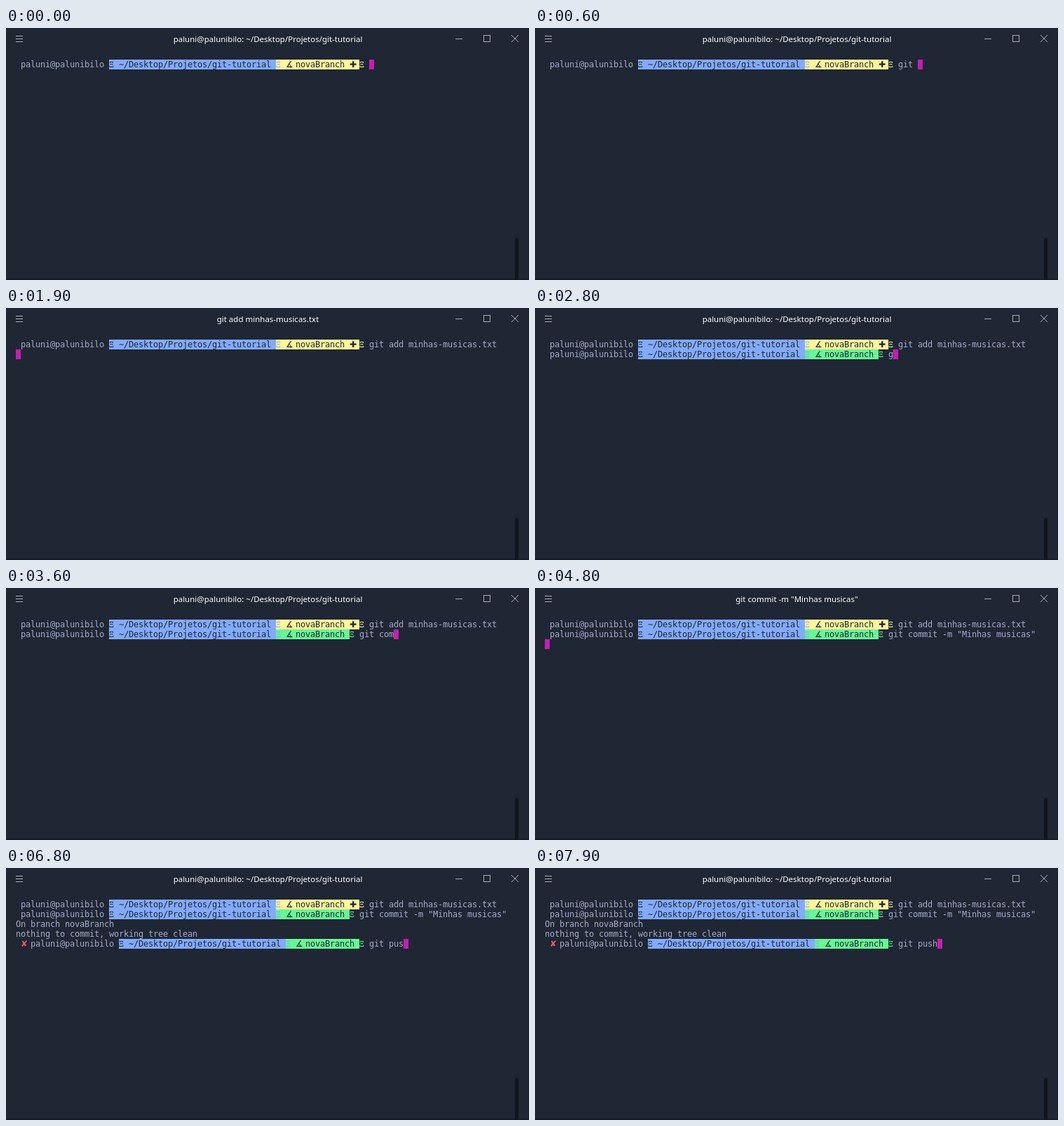
An HTML page with a canvas for the animation above (8000 ms loop, 746 by 359 pixels).

```html
<!DOCTYPE html>
<html lang="pt">
<head>
<meta charset="utf-8">
<title>Terminal</title>
<style>
html, body { margin: 0; width: 100%; height: 100%; overflow: hidden; background: #1e2733; }
canvas { display: block; }
</style>
</head>
<body>
<canvas id="stage" width="746" height="359"></canvas>
<script>
const ctx = document.getElementById('stage').getContext('2d');
const LOOP = 8000, CELL = 7, ROW = 14, LEFT = 14, TOP = 45;
const C = {
  bg: '#1e2733', text: '#a6accd', blue: '#82aaff', yellow: '#fff59b',
  green: '#69f694', cursor: '#c81cb4', red: '#ff5370',
  icon: '#a9aeb5', scroll: '#11161d', edge: '#161d26'
};
const MONO = '12px "DejaVu Sans Mono", monospace';
const SYMBOL = '12px "DejaVu Sans", sans-serif';
const SEPARATOR = '11px "Noto Serif", serif';
const USER = 'paluni@palunibilo';
const PATH = '~/Desktop/Projetos/git-tutorial';
const HOME_TITLE = `${USER}: ${PATH}`;

// keys: [time, number of characters typed]
const commands = [
  { text: 'git add minhas-musicas.txt', row: 0, start: 0, run: 1900, dirty: true,
    keys: [[300, 1], [400, 2], [600, 4], [800, 5], [1000, 7], [1200, 8], [1400, 26]] },
  { text: 'git commit -m "Minhas musicas"', row: 1, start: 2000, run: 4800,
    keys: [[2800, 1], [2900, 2], [3100, 3], [3300, 5], [3500, 6], [3600, 7], [4500, 30]],
    output: ['On branch novaBranch', 'nothing to commit, working tree clean'] },
  { text: 'git push', row: 4, start: 4900, run: Infinity, failed: true,
    keys: [[6100, 2], [6200, 3], [6400, 5], [6600, 6], [6800, 7], [7500, 8], [7600, 7], [7900, 8]] }
];

function rect(x, y, w, h, color) {
  ctx.fillStyle = color;
  ctx.fillRect(x, y, w, h);
}

function fontFor(ch) {
  if (ch === 'Ξ') return SEPARATOR;
  return '∡✚✘'.includes(ch) ? SYMBOL : MONO;
}

// Writes text on the character grid and returns the next free column.
function write(text, col, row, color, back) {
  const y = TOP + row * ROW;
  if (back) rect(LEFT + col * CELL, y, text.length * CELL, ROW, back);
  ctx.fillStyle = color;
  ctx.textAlign = 'left';
  for (const ch of text) {
    ctx.font = fontFor(ch);
    ctx.fillText(ch, LEFT + col * CELL, y + 11);
    col++;
  }
  return col;
}

function drawPrompt({ row, dirty, failed }) {
  const branchColor = dirty ? C.yellow : C.green;
  const branch = ' ∡ novaBranch ' + (dirty ? '✚ ' : '');
  let col = 1;
  if (failed) col = write('✘ ', col, row, C.red);
  col = write(USER + ' ', col, row, C.text);
  col = write(`Ξ ${PATH} `, col, row, C.bg, C.blue);
  col = write('Ξ', col, row, C.blue, branchColor);
  col = write(branch, col, row, C.bg, branchColor);
  return write('Ξ ', col, row, branchColor);
}

function drawCursor(col, row) {
  rect(LEFT + col * CELL, TOP + row * ROW, CELL, ROW, C.cursor);
}

function drawCommand(command, time) {
  let typed = 0;
  for (const [at, count] of command.keys) if (time >= at) typed = count;
  const col = write(command.text.slice(0, typed), drawPrompt(command), command.row, C.text);
  if (time < command.run) drawCursor(col, command.row);
  else if (time < command.run + 100) drawCursor(0, command.row + 1);
  else (command.output || []).forEach((line, i) => write(line, 0, command.row + 1 + i, C.text));
}

function drawWindow(title) {
  rect(0, 0, 746, 359, C.bg);
  rect(745, 0, 1, 359, C.edge);
  rect(0, 357, 746, 2, C.edge);

  ctx.fillStyle = C.scroll;
  ctx.beginPath();
  ctx.roundRect(726, 299, 5, 64, 2.5);
  ctx.fill();

  for (const y of [11, 15, 19]) rect(14, y, 10, 1, C.icon);
  rect(641, 15, 10, 1, C.icon);
  ctx.strokeStyle = C.icon;
  ctx.lineWidth = 1;
  ctx.strokeRect(681.5, 10.5, 9, 9);
  ctx.beginPath();
  ctx.moveTo(721, 10);
  ctx.lineTo(731, 20);
  ctx.moveTo(731, 10);
  ctx.lineTo(721, 20);
  ctx.stroke();

  ctx.font = '11.5px "Noto Sans", sans-serif';
  ctx.textAlign = 'center';
  ctx.fillStyle = '#fff';
  ctx.fillText(title, 373.5, 20);
}

function draw(now) {
  const time = now % LOOP;
  const running = commands.find(c => time >= c.run && time < c.run + 100);
  drawWindow(running ? running.text : HOME_TITLE);
  for (const command of commands) if (time >= command.start) drawCommand(command, time);
  requestAnimationFrame(draw);
}

draw(0);
</script>
</body>
</html>
```
